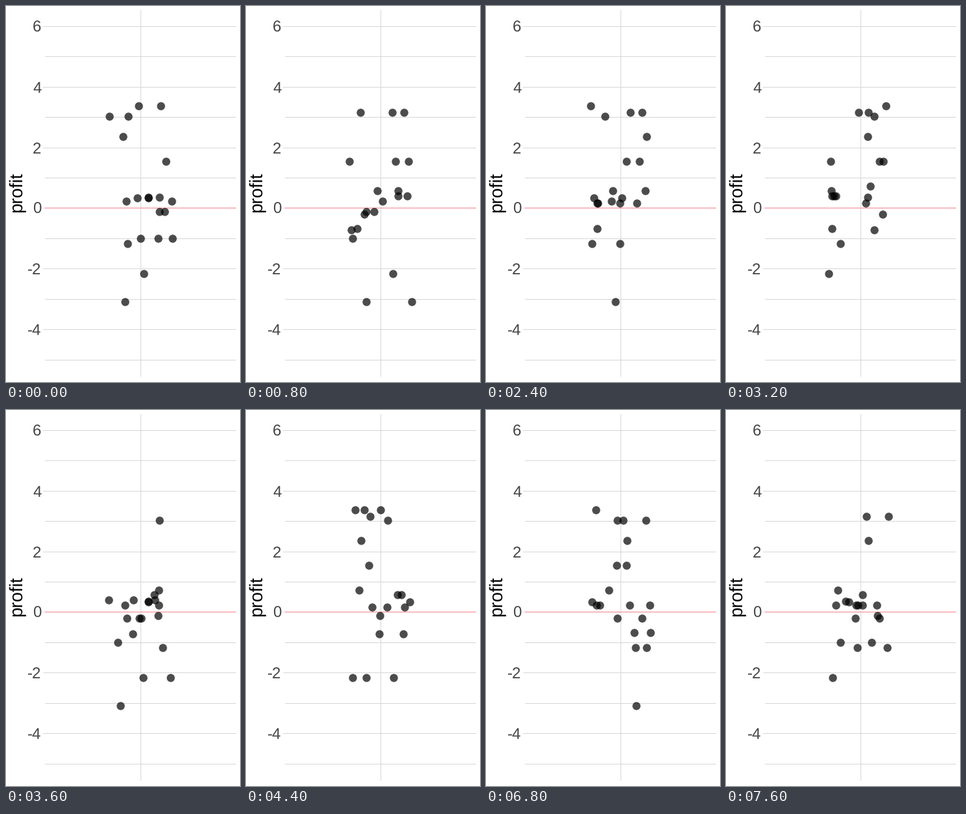
Write a matplotlib script that moves like this. It is 360x576 px and loops after 8 s.

```python
import math

import matplotlib.pyplot as plt
import numpy as np
from matplotlib.animation import FuncAnimation

WIDTH, HEIGHT, DPI = 360, 576, 72
ZERO_Y, UNIT = 309.92, 46.45  # pixel height of zero profit, pixels per unit
LEFT, RIGHT, CENTER = 60, 354, 207
JITTER, SAMPLE_SIZE, SEED = 49, 20, 7
FRAMES, INTERVAL = 20, 400
GRID, RED = "#d6d6d6", "#f0848a"

plt.rcParams["font.family"] = "Liberation Sans"
plt.rcParams["text.hinting"] = "none"

# Observed profits, from which every frame resamples with replacement.
PROFITS = np.array([3.38, 3.165, 3.025, 2.36, 1.55, 0.735, 0.575, 0.40, 0.36, 0.345,
                    0.23, 0.165, -0.115, -0.20, -0.66, -0.71, -0.995, -1.175, -2.165, -3.085])


def height(profit):
    return ZERO_Y - UNIT * profit


def row(profit):
    """Pixel row that holds the grid line of a value."""
    return math.floor(height(profit))


def hline(value, color, start=LEFT, end=RIGHT):
    y = row(value) + 0.5
    ax.plot([start, end], [y, y], color=color, lw=1, snap=False,
            solid_capstyle="butt", zorder=1)


def resample(frame):
    """Return the jittered pixel positions of one bootstrap sample."""
    rng = np.random.default_rng([SEED, frame])
    x = CENTER + rng.uniform(-JITTER, JITTER, SAMPLE_SIZE)
    y = height(rng.choice(PROFITS, SAMPLE_SIZE))
    return np.column_stack([x, y])


fig = plt.figure(figsize=(WIDTH / DPI, HEIGHT / DPI), dpi=DPI, facecolor="white")
ax = fig.add_axes([0, 0, 1, 1])
ax.axis("off")

for value in range(-5, 7):
    hline(value, GRID)
ax.plot([CENTER + 0.5] * 2, [6, 568], color=GRID, lw=1, snap=False,
        solid_capstyle="butt", zorder=1)
hline(0, RED)

for value in range(-4, 7, 2):
    hline(value, GRID, LEFT - 3, LEFT)
    ax.text(54.5, row(value) + 9, str(value), size=24, color="#454545",
            ha="right", va="baseline")
ax.text(24, 285.7, "profit", size=27.6, color="black", rotation=90,
        rotation_mode="anchor", ha="center", va="baseline")

dots = ax.scatter([], [], s=12.4 ** 2, color="black", alpha=0.7, linewidths=0, zorder=2)
ax.set(xlim=(0, WIDTH), ylim=(HEIGHT, 0))


def update(frame):
    dots.set_offsets(resample(frame))
    return [dots]


anim = FuncAnimation(fig, update, frames=FRAMES, interval=INTERVAL,
                     repeat=True, repeat_delay=0, blit=False)
plt.show()
```
